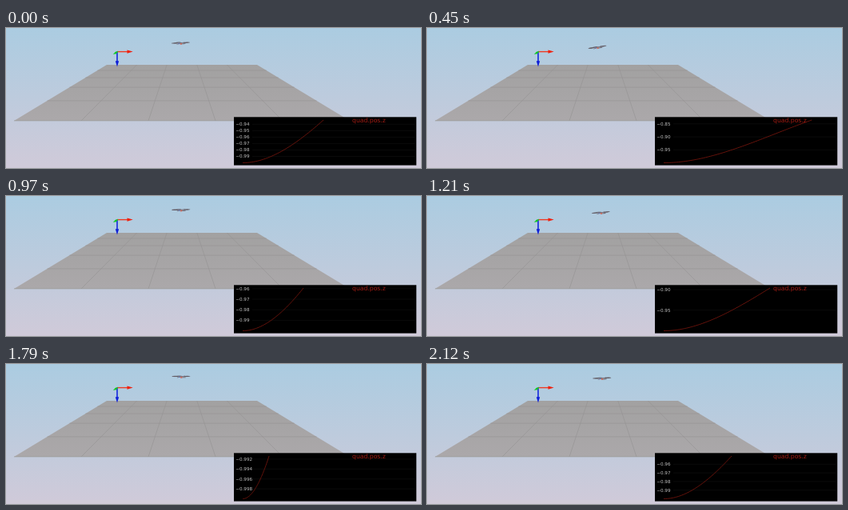
These frames come from a looping animation (519 by 175 pixels, 2150 ms). An HTML page:

```html
<!DOCTYPE html>
<html lang="en">
<head>
<meta charset="utf-8">
<title>Quadrotor drop</title>
<style>
  html, body { margin: 0; width: 100%; height: 100%; overflow: hidden; }
  svg { display: block; width: 100%; height: 100%; }
  text { font-family: "DejaVu Sans", sans-serif; }
  #ticks text { font-size: 5.6px; fill: #bdbdbd; }
  #ticks line { stroke: #0b0b0b; stroke-width: 1; }
</style>
</head>
<body>
<svg viewBox="0 0 519 175">
  <defs>
    <linearGradient id="sky" x2="0" y2="1">
      <stop stop-color="#abcce1"/>
      <stop offset=".5" stop-color="#bdcbdd"/>
      <stop offset="1" stop-color="#d0cad9"/>
    </linearGradient>
    <linearGradient id="ground" x2="0" y2="1">
      <stop stop-color="#a2a1a1"/>
      <stop offset="1" stop-color="#aba8aa"/>
    </linearGradient>
    <clipPath id="plotArea"><rect x="285" y="111.5" width="228" height="60"/></clipPath>
  </defs>
  <rect width="519" height="175" fill="url(#sky)"/>
  <path d="M126 46H314L430 116H10Z" fill="url(#ground)"/>
  <path id="tiles" fill="none" stroke="#949393" stroke-width=".6"/>
  <path d="M10 115.9H430" stroke="#999a98" stroke-width=".7"/>

  <g id="axes">
    <path d="M139 29.5V42" stroke="#1426dc" stroke-width="1.6"/>
    <path d="M136.8 41.3H141.2L139 48.5Z" fill="#0f1fd8"/>
    <path d="M139 29.6H152" stroke="#ee3a22" stroke-width="1.4"/>
    <path d="M151.5 27.4V31.8L158.7 29.6Z" fill="#f01f0c"/>
    <path d="M140 29.4L136.5 31.2" stroke="#19c52c" stroke-width="1.6"/>
    <path d="M137.6 29.2L138.4 32.2L133.8 32.7Z" fill="#12c926"/>
  </g>

  <g id="drone">
    <path d="M-9 -.2H9M-5 1.2L5 -.8" stroke="#6b6470" stroke-width=".7"/>
    <g fill="#5d535b" fill-opacity=".85">
      <ellipse cx="-7.6" cy="-.4" rx="4" ry=".7"/>
      <ellipse cx="7.6" cy="-.4" rx="4" ry=".7"/>
      <ellipse cx="-2.6" cy="-.9" rx="3.4" ry=".5"/>
      <ellipse cx="3" cy="1" rx="3.4" ry=".5"/>
    </g>
    <rect x="-3.2" y="-.2" width="2" height="1.3" fill="#6a74a8"/>
    <rect x="-.8" y=".1" width="2.2" height="1.8" fill="#cc6a5c"/>
    <rect x="1.6" y="-.2" width="1.4" height="1.2" fill="#9a8f95"/>
  </g>

  <rect x="285" y="111.3" width="228.2" height="60.3"/>
  <g clip-path="url(#plotArea)">
    <g id="ticks"></g>
    <path id="curve" fill="none" stroke="#84190f" stroke-width=".75"/>
    <text x="433" y="117.7" font-size="7.7" fill="#a21c13">quad.pos.z</text>
  </g>
</svg>
<script>
const LOOP = 2150;
const TICK = 30;
const PLOT = { left: 296, right: 511, top: 115, bottom: 168.5 };

// [time in ms, x of the curve's leading end]; equal times mark a reset
const PROGRESS = [
  [0, 397], [30, 401], [210, 436], [550, 506], [610, 506],
  [610, 307], [670, 320], [700, 320], [970, 372], [1210, 429],
  [1640, 504], [1640, 301], [1670, 307], [1760, 307], [1760, 320],
  [1790, 329], [1820, 329], [2120, 381], [2150, 397]
];

const byId = id => document.getElementById(id);
const ticks = byId("ticks"), curve = byId("curve"), drone = byId("drone");

function make(tag, parent) {
  return parent.appendChild(document.createElementNS("http://www.w3.org/2000/svg", tag));
}

function drawTiles() {
  const mix = (a, b, s) => a + (b - a) * s;
  let d = "";
  for (let i = 1; i < 5; i++) {
    const s = i / 5;
    const v = (420 / (1 + 1.234 * s) - 188) / 232;
    d += `M${mix(126, 314, s)} 46L${mix(10, 430, s)} 116`;
    d += `M${mix(126, 10, v)} ${mix(46, 116, v)}H${mix(314, 430, v)}`;
  }
  byId("tiles").setAttribute("d", d);
}

// The picture is sampled every 30 ms, with 10 ms extra in each half loop
function sampleTime(t) {
  const slip = 10 * Math.floor((t + 695) * 2 / LOOP);
  return Math.floor((t - slip) / TICK) * TICK + slip;
}

function progressAt(t) {
  let i = PROGRESS.length - 2;
  while (i > 0 && PROGRESS[i][0] > t) i--;
  const [t0, x0] = PROGRESS[i], [t1, x1] = PROGRESS[i + 1];
  return x0 + (x1 - x0) * (t - t0) / (t1 - t0) - PLOT.left;
}

// Height lost after dx pixels of plotted time: gravity with drag
const drop = dx => dx * dx * (8.6e-6 - 2.05e-8 * dx);

function tickStep(range) {
  const unit = 10 ** Math.floor(Math.log10(range));
  const m = range / unit;
  return unit * (m < 2 ? 0.5 : m < 7 ? 1 : 2);
}

function drawPlot(dx) {
  const range = drop(dx);
  const scale = (PLOT.bottom - PLOT.top) / range;
  const yOf = rise => PLOT.bottom - rise * scale;

  const points = [];
  for (let i = 0; i <= 60; i++) {
    const x = dx * i / 60;
    points.push(`${(PLOT.left + x).toFixed(2)} ${yOf(drop(x)).toFixed(2)}`);
  }
  curve.setAttribute("d", "M" + points.join("L"));

  const step = tickStep(range);
  const digits = Math.ceil(-Math.log10(step) - 1e-6);
  ticks.replaceChildren();
  for (let n = 1; n * step <= range; n++) {
    const y = yOf(n * step);
    const line = make("line", ticks);
    line.setAttribute("x1", 308);
    line.setAttribute("x2", PLOT.right);
    line.setAttribute("y1", y);
    line.setAttribute("y2", y);
    const label = make("text", ticks);
    label.setAttribute("x", 287.3);
    label.setAttribute("y", y + 2);
    label.textContent = "\u2212" + (1 - n * step).toFixed(digits);
  }
}

function drawDrone(dx) {
  const x = 219 - 9 * (dx / 206) ** 4;
  const y = 15.3 + 54 * drop(dx);
  const tilt = -5 * (dx / 138) ** 2;
  drone.setAttribute("transform", `translate(${x} ${y}) rotate(${tilt})`);
}

function render(t) {
  const dx = progressAt(sampleTime(t));
  drawPlot(dx);
  drawDrone(dx);
}

drawTiles();
render(0);
const start = performance.now();
requestAnimationFrame(function tick() {
  render((performance.now() - start) % LOOP);
  requestAnimationFrame(tick);
});
</script>
</body>
</html>
```
